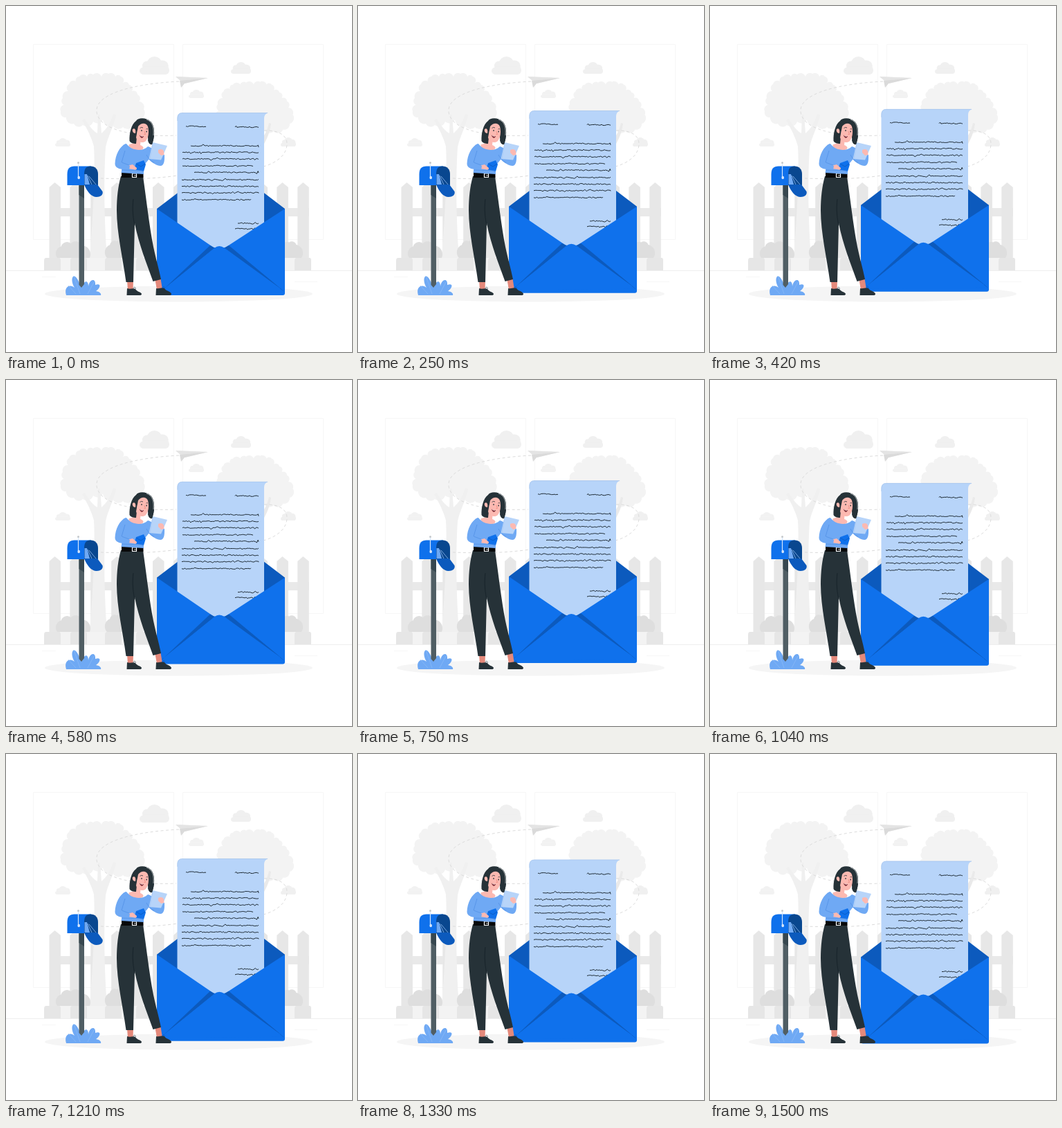
An HTML page with a canvas for the animation above (1540 ms loop, 500 by 500 pixels).

```html
<!DOCTYPE html>
<html lang="en">
<head>
<meta charset="utf-8">
<title>Letter</title>
<style>
html, body { margin: 0; width: 100%; height: 100%; overflow: hidden; background: #fff; }
canvas { display: block; width: 500px; height: 500px; }
</style>
</head>
<body>
<canvas id="stage"></canvas>
<script>
const canvas = document.getElementById('stage');
const ctx = canvas.getContext('2d');
const ratio = window.devicePixelRatio || 1;
canvas.width = canvas.height = 500 * ratio;

const LOOP = 1540;
const BLUE = '#0f71ec', DEEP = '#0c5abd', NAVY = '#09478f';
const SKY = '#6fa9f4', PALE = '#b7d4f9';
const INK = '#263238', SKIN = '#fcb9b1', SOCK = '#e4897b';

function fill(d, color) {
  ctx.fillStyle = color;
  ctx.fill(new Path2D(d));
}

function line(d, color, width = 1, dash = []) {
  ctx.strokeStyle = color;
  ctx.lineWidth = width;
  ctx.setLineDash(dash);
  ctx.stroke(new Path2D(d));
}

function oval(x, y, rx, ry, color, turn = 0) {
  ctx.fillStyle = color;
  ctx.beginPath();
  ctx.ellipse(x, y, rx, ry, turn, 0, Math.PI * 2);
  ctx.fill();
}

function box(x, y, w, h, color) {
  ctx.fillStyle = color;
  ctx.fillRect(x, y, w, h);
}

// Closed clockwise outline whose sides bulge outwards.
function scallop(points) {
  let [x, y] = points[points.length - 1];
  let d = `M${x} ${y}`;
  for (const [px, py] of points) {
    const r = Math.hypot(px - x, py - y) * 0.6;
    d += `A${r} ${r} 0 0 1 ${px} ${py}`;
    [x, y] = [px, py];
  }
  return d + 'Z';
}

const CROWN = scallop([
  [79, 152], [84, 143], [82, 133], [90, 123], [91, 113], [101, 109], [106, 102],
  [117, 102], [126, 99], [138, 102], [148, 98], [158, 102], [166, 102], [169, 111],
  [178, 114], [182, 123], [190, 128], [192, 138], [199, 149], [194, 163], [184, 172],
  [169, 175], [154, 172], [140, 164], [126, 167], [111, 172], [98, 170], [87, 161]
]);
const TRUNK = 'M121 364C126 300 129 235 127 203C124 191 118 179 110 165L114 163' +
  'C120 173 126 181 132 184L133 157L136 157L138 184C146 177 151 169 155 156L159 157' +
  'C156 174 147 189 144 204C141 250 142 310 146 364Z';

function tree(x, y, scale) {
  ctx.save();
  ctx.translate(x, y);
  ctx.scale(scale, scale);
  fill(CROWN, '#f3f3f3');
  ctx.restore();
}

function cloud(x, y, w, h, color) {
  oval(x + w * .5, y + h * .36, w * .24, h * .36, color);
  oval(x + w * .26, y + h * .52, w * .17, h * .27, color);
  oval(x + w * .76, y + h * .52, w * .21, h * .31, color);
  oval(x + w * .14, y + h * .8, w * .14, h * .2, color);
  oval(x + w * .87, y + h * .76, w * .13, h * .24, color);
  box(x + w * .12, y + h * .55, w * .76, h * .45, color);
}

function bush(x, w, h) {
  fill(scallop([[x, 364], [x + w * .12, 364 - h * .55], [x + w * .42, 364 - h * .7],
    [x + w * .75, 364 - h * .6], [x + w, 364]]), '#dedede');
}

function fence() {
  box(64, 292, 374, 12, '#e9e9e9');
  for (let i = 0; i < 13; i++) {
    const x = 62.5 + i * 29.9;
    fill(`M${x} 364V262L${x + 8} 255L${x + 16.5} 262V364Z`, '#e7e7e7');
  }
}

function background() {
  box(0, 0, 500, 500, '#fff');
  line('M39.5 55.5H242.5V337.5H39.5ZM255.5 55.5H458.5V337.5H255.5Z', '#f6f6f6');
  line('M0 382.5H500', '#eee');
  line('M417 398.5H450M52 391.5H72', '#f6f6f6');
  cloud(193, 73, 43, 26, '#f0f0f0');
  cloud(325, 81, 29, 17, '#f0f0f0');
  cloud(264, 121, 22, 12, '#f2f2f2');
  cloud(71, 191, 22, 12, '#f2f2f2');
  cloud(397, 190, 22, 13, '#f0f0f0');

  tree(0, 0, 1);
  tree(230, 19, .927);
  fence();
  fill(TRUNK, '#f0f0f0');
  fill('M360 205C370 192 377 184 380 169L383 170C381 186 374 198 368 208Z', '#eaeaea');

  bush(74, 47, 30);
  bush(146, 34, 34);
  bush(396, 31, 32);
  box(58, 364, 380, 18, '#f3f3f3');
  for (const x of [58, 96, 146, 191, 381, 420]) fill(
    `M${x} 364H${x + 19}Q${x + 21} 364 ${x + 21} 368V382H${x - 3}V368Q${x - 3} 364 ${x} 364Z`, '#e6e6e6');
  oval(249.5, 416, 193.5, 11.5, '#f5f5f5');

  line('M250 109C190 112 131 125 131 151C131 177 178 190 246 187' +
    'M373 180C394 179 406 187 406 199C406 216 390 227 372 232' +
    'M137 249C170 250 205 251 248 245', '#dcdcdc', 1, [4, 3.5]);
  fill('M245 102L292 104L259 112Z', '#ebebeb');
  fill('M245 102L292 104L252 108Z', '#e4e4e4');
  fill('M251 108L292 104L258 112L253 118Z', '#dadada');
}

function mailbox() {
  fill('M87 418C83 404 94 402 99 407C91 394 98 381 106 400L110 406C113 396 119 396 119 405' +
    'C121 394 130 393 129 403C137 400 138 406 130 412C136 413 138 416 137 418Z', SKY);
  line('M98 390L107 416M127 399L118 416M90 404L101 416', '#8bbaf7', .7);
  fill('M105.5 258H113V402L109 407L105.5 403Z', '#505e64');
  fill('M105.5 259H113V278L105.5 273Z', '#37474f');
  fill('M88.5 259V243C88.5 235 92 231.5 99 231.5H123V259Z', BLUE);
  fill('M113 259V243C113 235 116 231.5 122 231.5C129 231.5 133 236 133 243V259Z', NAVY);
  fill('M113.5 243L117 243L121 258H113.5Z', SKY);
  fill('M113 258H132L139.5 268C141 273 136 276 131 276C123 276 117 268 113 258Z', DEEP);
  line('M118 245L124 258M120 246L130 258', '#82aee6', .9);
  line('M104.5 228V247', '#d6e6fc', 1.2);
  oval(104.5, 226.5, 1.5, 1.5, '#c5c9cc');
  oval(105.2, 248, 1.8, 2.2, '#d6e6fc');
}

function seeded(seed) {
  return () => (seed = seed * 16807 % 2147483647) / 2147483647;
}

// Handwriting: a nearly flat line with small uneven ripples.
function scribble(x, end, y, seed) {
  const random = seeded(seed * 7919 + 13);
  let d = `M${x} ${y}`;
  while (x < end) {
    x = Math.min(end, x + 1.3 + random() * 1.5);
    const swing = random() < .1 ? 4.2 : 1.7;
    d += `L${x.toFixed(1)} ${(y + (random() - .5) * swing).toFixed(1)}`;
  }
  return d;
}

const WRITING = [
  [260, 289, 174], [331, 365, 175], [267, 365, 202], [255, 365, 211.5], [255, 365, 221],
  [255, 357, 231], [272, 365, 240.5], [254, 365, 251], [254, 365, 260.5],
  [254, 365, 270], [254, 354, 280], [335, 365, 314], [331, 365, 322]
].map(([x, end, y], i) => scribble(x, end, y, i + 1)).join('');

function envelope(dy) {
  ctx.save();
  ctx.translate(0, dy);
  fill('M218 293L306 226H315L403 293V340H218Z', DEEP);
  fill('M247.5 360V163C247.5 157 250 154.3 255 154.3H379C375 155.5 373 158 373 163V360Z', PALE);
  line('M247.8 166V163C247.8 157 250 154.6 255 154.6H378', '#9fc0ea', .6);
  line(WRITING, '#1d2a33', 1);
  fill('M218 293L300 349H317L403 293V415Q403 418 400 418H221Q218 418 218 415Z', BLUE);
  fill('M295 346L301.5 349.5L228 409ZM322 346L315.5 349.5L399 410Z', DEEP);
  fill('M222 414L301 350Q308 344 316 350L399 412Z', BLUE);
  line('M228 409L222 413.5M396 408L401 412', DEEP, .5);
  ctx.restore();
}

function legs() {
  fill('M175 397H184L183.5 410H176ZM215.5 396L223.5 394L226 410H218Z', SOCK);
  fill('M175 408C180 410 183 407 187 409C189 413 195 413 196 416Q196 418 193 418H174.5Z', INK);
  fill('M217 408C222 409 225 406 229 408C231 412 238 412 239 416Q239 418 236 418H216.5Z', INK);
  line('M184 409C184 405 188 406 187 409', '#536068', .8);
  line('M226 408C226 405 230 405 229 408', DEEP, .8);
  fill('M166 246H198C203 281 207 317 213 348C217 367 221 380 224 395L212.5 398' +
    'C204 374 192 345 186 314L184 399H173.5C169 365 160 328 160 295C160 277 162 260 166 246Z', INK);
  line('M184 279C182 293 184 309 186 317', '#17232a', 1);
  box(167, 241, 31.5, 7, '#08090a');
  line('M182.5 242H188.5V247.5H182.5Z', '#fff', 1.2);
  line('M185 245H188', '#fff', .8);
}

function body() {
  fill('M186 190H195L194 201C202 204 199 209 188 209C180 207 176 203 178 200L186 198Z', SKIN);
  fill('M174 199C181 209 197 211 205 203C210 204 213 207 212 212C210 220 201 226 199 232' +
    'L199 243L166.5 241C169 231 166 221 166 210C167 203 170 200 174 199Z', SKY);
  fill('M205 204C211 205 213 211 215 217L223 216L229 215C229.5 225 228 231 223 231' +
    'C215 230 208 224 204 219Z', SKY);
  line('M203 215C206 221 210 225 214 226', '#4f8fe4', .7);
  fill('M212 197L233 202L224 222.5L206.5 221Z', PALE);
  line('M212 197L208 221', '#a0c4f5', .6);
  fill('M220 208C224 206 227 207 228 210L228.5 215L224 216L220 212Z', SKIN);

  fill('M188 227L199 223L202 229L199 239L185 236Z', BLUE);
  line('M188 228L195 232L201 228', DEEP, .8);
  fill('M175 231L183 229L189 234Q189 238 184 236L175 235Z', SKIN);
  fill('M173 199C164 203 158 215 157.5 228C158 236 168 236 178 237L179 231L167 227L173 211Z', SKY);
  line('M172 209L167 226L178 230M167 237L199 238', '#4f8fe4', .7);
}

function head() {
  fill('M178.5 195C178 184 181 171 188 166C191 161 203 161 209 167C216 173 215 190 211 200' +
    'C207 200 205 195 205 189L190 180L188 199C184 199 180 198 178.5 195Z', INK);
  fill('M191 174C195 169 202 168 205 174C207 182 206 190 202 195C198 199 190 197 188 190Z', SKIN);
  fill('M204 168C209 174 208 189 205 194C206 199 209 201 211 200C215 190 216 175 209 167Z', INK);
  line('M203 164C212 167 214 176 213 187', '#fff', .6);
  fill('M183 178C186 176 188 179 187 184C184 184 182 181 183 178Z', SKIN);
  oval(196, 180, .8, 1.1, INK);
  oval(203.2, 181.5, .8, 1.1, INK);
  line('M193.5 176.5Q195.5 174.5 198 176M202.5 178Q203.5 177 205 178', INK, .8);
  line('M200 181L201.5 185.5L199.5 185.5', '#e88378', .7);
  fill('M193 186.5Q196 188.5 199 188Q198 191.5 195.5 190.5Q193.5 189.5 193 186.5Z', '#7c2730');
  line('M194 187.3Q196 188.6 198 188.4', '#fff', .7);
}

function draw(time) {
  // Steady rise and fall, stepped 24 times a second.
  const step = Math.floor((time % LOOP + 5) * .024);
  const dy = 9.75 * (Math.abs(step - 17.5) - 17.5) / 18.5;
  ctx.setTransform(ratio, 0, 0, ratio, 0, 0);
  ctx.lineJoin = 'round';
  background();
  mailbox();
  envelope(dy);
  legs();
  body();
  head();
}

let start;
function tick(now) {
  start ??= now;
  draw(now - start);
  requestAnimationFrame(tick);
}
draw(0);
requestAnimationFrame(tick);
</script>
</body>
</html>
```
